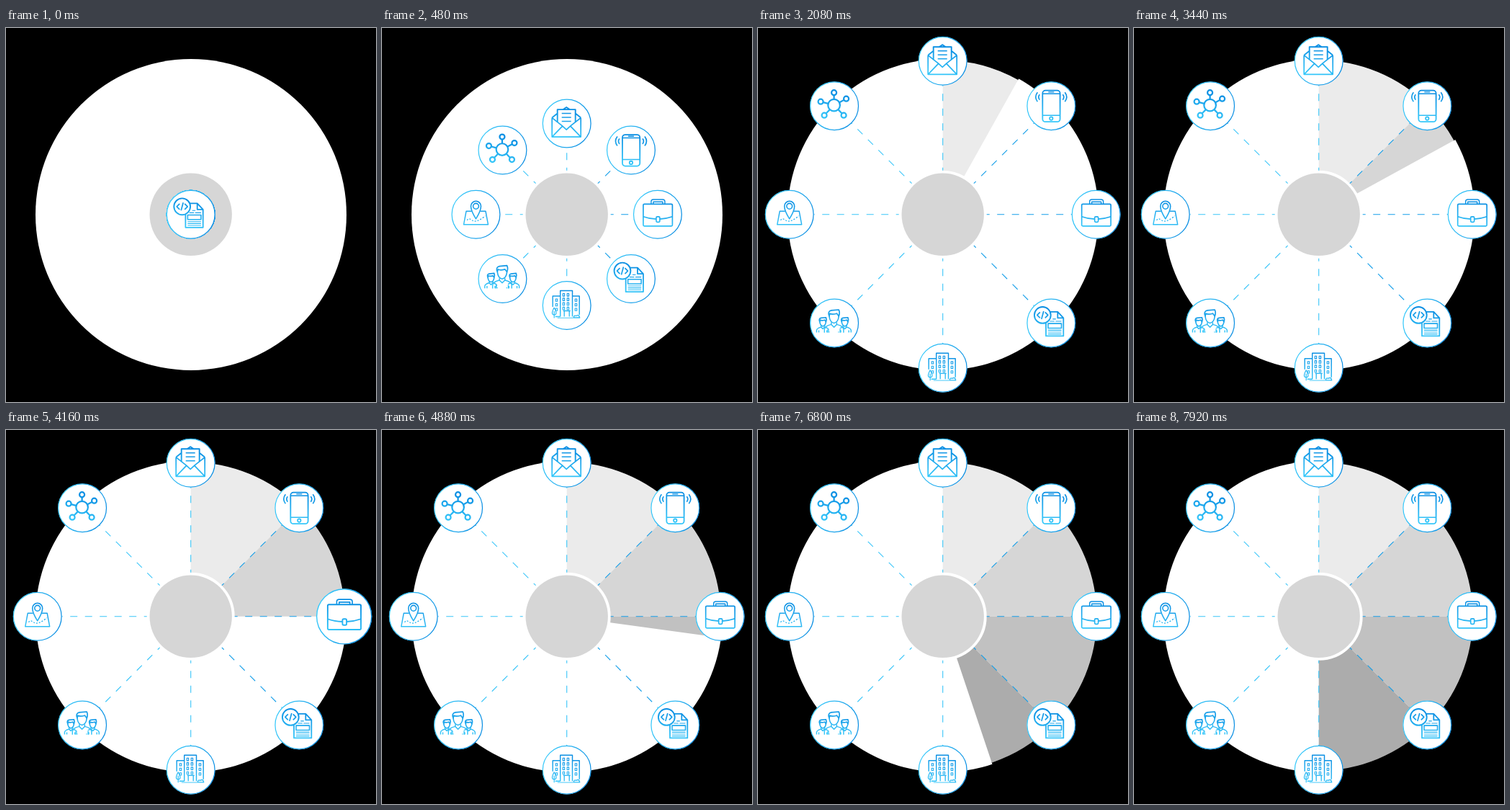
Animation of 514x519 px, one loop 8 s. Source, as an HTML page with a canvas:

```html
<!DOCTYPE html>
<html lang="en">
<head>
<meta charset="utf-8">
<title>Sector wheel</title>
<style>
html, body { margin: 0; width: 100%; height: 100%; overflow: hidden; background: #000; }
canvas { display: block; width: 514px; height: 519px; }
</style>
</head>
<body>
<canvas id="stage" width="514" height="519"></canvas>
<script>
const ctx = document.getElementById('stage').getContext('2d');
const TAU = Math.PI * 2, CX = 256.7, CY = 258.8;
const LOOP = 8000, STEP = 80;
const ORBIT = 213, RING = 61, BADGE = 33.4, RIM = 216;
const FLY = 810;                       // icons travel outwards
const PULSE = 750, SWEEP = 800, GAP = 40, PERIOD = PULSE + SWEEP + GAP;
const GREYS = ['#ebebeb', '#d6d6d6', '#c1c1c1', '#acacac'];
const WEIGHT = 1.12;

const clamp = v => Math.max(0, Math.min(1, v));
const up = a => a - Math.PI / 2;

function gradient(x0, y0, x1, y1, from = '#0b8fe3', to = '#36c8fa') {
  const g = ctx.createLinearGradient(x0, y0, x1, y1);
  g.addColorStop(0, from);
  g.addColorStop(1, to);
  return g;
}

function disc(x, y, r, color) {
  ctx.fillStyle = color;
  ctx.beginPath();
  ctx.arc(x, y, r, 0, TAU);
  ctx.fill();
}

function stroke(d, w = 1.4) {
  ctx.lineWidth = w * WEIGHT;
  ctx.stroke(new Path2D(d));
}

function ring(x, y, r, w = 1.5) {
  ctx.lineWidth = w * WEIGHT;
  ctx.beginPath();
  ctx.arc(x, y, r, 0, TAU);
  ctx.stroke();
}

function box(x, y, w, h, r = 0, lw = 1.4) {
  ctx.lineWidth = lw * WEIGHT;
  ctx.beginPath();
  ctx.roundRect(x, y, w, h, r);
  ctx.stroke();
}

function mail() {
  stroke('M-20.5-8V18.5H19.5V-8M-20.5-8L-6.5 3L-.5 8.5L5.5 3L19.5-8M-20.5 18.5L-6.5 4M19.5 18.5L5.5 4', 1.5);
  stroke('M-20.5-8L-13-14M19.5-8L12-14M-13-2V-19.5H12V-2M-5-19.5L-.5-22.5L4-19.5', 1.7);
  stroke('M-7-14H6M-7-8.5H6M-7-3H6', 1.4);
}

function phone() {
  box(-12, -21.5, 24.3, 43.5, 4, 1.6);
  stroke('M-12-17H12M-12 13H12M-4-19.3H4', 1.3);
  ring(0, 17.4, 2.2, 1.6);
  stroke('M-16-16Q-19-12.5-16-8.5M-19-19Q-24-12.5-19-6M16-16Q19-12.5 16-8.5M19-19Q24-12.5 19-6', 1.5);
}

function briefcase() {
  box(-20, -14.5, 40.5, 30.5, 1.5, 1.5);
  stroke('M-9-14.5V-18Q-9-20.8-6-20.8H7Q10-20.8 10-18V-14.5M-6-14.5V-17.5H7V-14.5', 1.3);
  stroke('M-20 3Q-12 6-2 6.3M3 6.3Q12 6 20.5 3', 1.4);
  box(-2, 3, 5, 7.5, 1.5, 1.5);
}

function code() {
  stroke('M-7.3 0V18H17V-7L9-15.5H-2M9-15.5V-7H17', 1.6);
  box(-4.3, 0.7, 18.5, 6.3, 0, 1.4);
  stroke('M-2-2.4H4.5M6-2.4H14.2M2-5.5H6.5', 1);
  stroke('M-4.3 10H14.2M-4.3 12.6H14.2M-4.3 15.2H14.2', 1);
  disc(-12, -11, 11.5, '#fff');
  ring(-12, -11, 11.4, 1.7);
  stroke('M-15.5-15L-19.5-11L-15.5-7M-8.5-15L-4.5-11L-8.5-7M-10.5-16.5L-13.5-5.5', 1.5);
}

function building() {
  stroke('M-9 15.5V-20.5H7.8V15.5M-9-13H-19.5V2M-16 15.5H-9M7.8-13H17.5V13', 1.3);
  for (let row = 0; row < 4; row++)
    for (let col = 0; col < 2; col++) box(-5.5 + col * 6, -16.5 + row * 6.3, 2.4, 3.6, 0, 1);
  for (let row = 0; row < 3; row++) {
    box(-15.5, -9 + row * 6.5, 2.5, 3.2, 0, 1);
    box(11.5, -9 + row * 6.5, 2.5, 3.2, 0, 1);
  }
  stroke('M-5 7.5H5M-3.5 15.5V8M3.5 15.5V8', 1.2);
  stroke('M-17.5 17.5V8M-17.5 3Q-23 13-17.5 13Q-12 13-17.5 3', 1.1);
  stroke('M9.5 17Q10 13 13 14.5Q17 12 18 17Z', 1.2);
  stroke('M-13 17.3H9', 0.8);
}

function person(x, y, s) {
  ctx.save();
  ctx.translate(x, y);
  ctx.scale(s, s);
  stroke('M-7-2Q-6 7 0 8Q6 7 7-2', 1.4 / s);
  stroke('M-7-2Q-10-9-4-10.5L7-11.5Q9-7 7-2Q5-5 4-6Q-3-4-6-6Z', 1.5 / s);
  stroke('M-4 7V10L0 14L4 10V7M-4 10Q-13 12-14 17V22M4 10Q13 12 14 17V22M-9 17V22M9 17V22', 1.3 / s);
  ctx.restore();
}

function people() {
  person(-16, -.5, .62);
  person(14.5, -.5, .62);
  ctx.fillStyle = '#fff';
  ctx.fillRect(-7.5, -17, 15, 29);
  person(-.5, -7.5, .95);
}

function map() {
  stroke('M-6-4.5H-13.5L-17 14H17L13.5-4.5H6', 1.3);
  stroke('M0 6Q-7-5-7-11.5A7 7 0 0 1 7-11.5Q7-5 0 6Z', 1.4);
  ring(0, -11.5, 3.9, 1.4);
  ctx.setLineDash([2, 2]);
  stroke('M-13 10Q-11 4-7 7T1 9T9 5T13 2', 1.2);
  ctx.setLineDash([]);
}

function network() {
  const nodes = [[-.5, -18.5], [16.5, -10], [-19, -6], [-14, 13], [13, 13]];
  ring(-.5, -1, 8.3, 2);
  for (const [x, y] of nodes) {
    const dx = x + .5, dy = y + 1, len = Math.hypot(dx, dy);
    const a = 8.6 / len, b = 1 - 3.6 / len;
    stroke(`M${dx * a - .5} ${dy * a - 1}L${dx * b - .5} ${dy * b - 1}`, 2);
    ring(x, y, 3.5, 2);
  }
}

const ICONS = [mail, phone, briefcase, code, building, people, map, network];
const ORDER = [7, 6, 5, 4, 2, 1, 0, 3];

function badge(i, dist, scale) {
  const a = up(i * TAU / 8);
  ctx.save();
  ctx.translate(CX + Math.cos(a) * dist, CY + Math.sin(a) * dist);
  ctx.scale(scale, scale);
  disc(0, 0, BADGE + .4, '#fff');
  ctx.strokeStyle = gradient(30, 10, -30, -10);
  ring(0, 0, BADGE, 1.1);
  ctx.strokeStyle = gradient(4, -18, -4, 20);
  ICONS[i]();
  ctx.restore();
}

function band(from, to, inner, outer, color) {
  ctx.fillStyle = color;
  ctx.beginPath();
  ctx.arc(CX, CY, outer, up(from), up(to));
  ctx.arc(CX, CY, inner, up(to), up(from), true);
  ctx.fill();
}

function spokes(reach) {
  if (reach <= RING) return;
  ctx.lineWidth = 1.1;
  ctx.setLineDash([10, 10.5]);
  ctx.lineDashOffset = 6;
  for (let i = 0; i < 8; i++) {
    const a = up(i * TAU / 8), c = Math.cos(a), s = Math.sin(a);
    ctx.strokeStyle = i > 0 && i < 4 ? '#159fe9' : '#3ac6f9';
    ctx.beginPath();
    ctx.moveTo(CX + c * RING, CY + s * RING);
    ctx.lineTo(CX + c * reach, CY + s * reach);
    ctx.stroke();
  }
  ctx.setLineDash([]);
}

function draw(t) {
  ctx.fillStyle = '#000';
  ctx.fillRect(0, 0, 514, 519);
  disc(257, 259, RIM, '#fff');

  // each swept sector ends slightly inside the white rim
  GREYS.forEach((grey, i) => {
    const p = clamp((t - FLY - PULSE - i * PERIOD) / SWEEP);
    if (!p) return;
    const from = i * TAU / 8, to = from + p * TAU / 8;
    band(from, to, RIM - 3, RIM + 1.5, '#000');
    band(from, to, RING, RIM - 2, grey);
  });
  disc(CX, CY, 57.2, '#d6d6d6');

  const dist = ORBIT * clamp(t / FLY);
  spokes(dist - BADGE);
  for (const i of ORDER) {
    const p = clamp((t - FLY - i * PERIOD) / PULSE);
    const bump = 1 - Math.abs(2 * p - 1);
    badge(i, dist, 1 + .31 * bump);
  }
}

ctx.lineJoin = 'round';
function tick() {
  const t = performance.now() % LOOP;
  draw(Math.floor(t / STEP) * STEP);
  requestAnimationFrame(tick);
}
tick();
</script>
</body>
</html>
```
